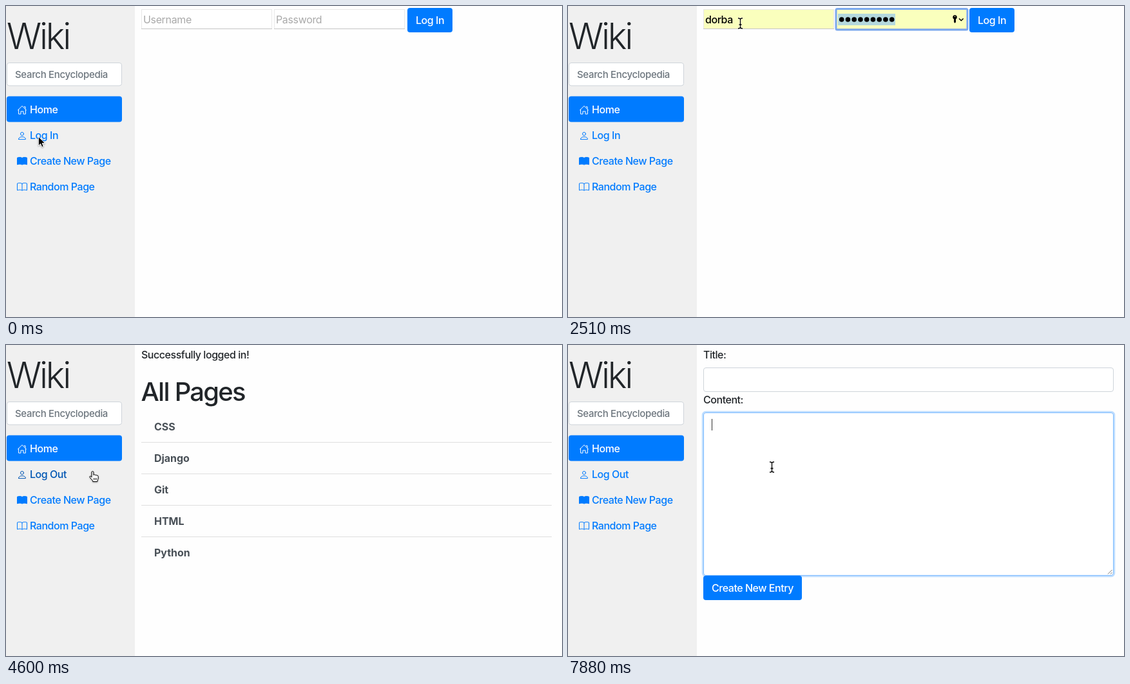
An HTML page that plays this animation: 863x484 px, repeating every 8000 ms.

```html
<!DOCTYPE html>
<html lang="en">
<head>
<meta charset="utf-8">
<title>Wiki</title>
<style>
  html, body { margin: 0; width: 100%; height: 100%; overflow: hidden; background: #fefefe; }
  svg { display: block; width: 100%; height: 100%; }
  text {
    font: 450 16px Inter, "Liberation Sans", sans-serif;
    font-optical-sizing: none;
    letter-spacing: -.029em;
    fill: #212529;
    white-space: pre;
  }
  .brand { font-size: 56px; font-weight: 300; letter-spacing: -.057em; }
  .heading { font-size: 40px; font-weight: 500; letter-spacing: -.044em; }
  .search { font-size: 15px; letter-spacing: -.022em; fill: #6c757d; }
  .hint { font-weight: 400; letter-spacing: -.022em; fill: #a9a9a9; }
  .item { font-weight: 700; letter-spacing: -.002em; fill: #495057; }
  .small { font-size: 13px; }
  .tiny { font-size: 11px; fill: #85858a; }
  .light, .light text { fill: #fff; color: #fff; }
  .link { color: #007bff; }
  .link.hover { color: #0056b3; }
  .link text { fill: currentColor; }
  .solid { fill: currentColor; }
  .line { fill: none; stroke: currentColor; stroke-linejoin: round; stroke-linecap: round; }
  .line.solid { fill: currentColor; }
  .primary { fill: #007bff; }
  .control { fill: #fff; stroke: #ced4da; }
  .ring { fill: none; stroke: #7ba8ee; stroke-width: 3; }
  .popup { filter: drop-shadow(0 2px 4px rgba(0, 0, 0, .3)); }
  .cursor { filter: drop-shadow(0 1px .8px rgba(0, 0, 0, .35)); }
</style>
</head>
<body>
<svg viewBox="0 0 863 484">
  <defs>
    <g id="field">
      <rect width="202" height="30" x=".5" y=".5" stroke="#e8e8e8"/>
      <path d="M0 30.5H203" stroke="#c6c6c6"/>
    </g>
    <path id="house" d="M1.5 8 8 1.6 14.5 8M2.6 7.2V14.1H6V10H10V14.1H13.4V7.2M11.2 2.8H13V5.6"/>
    <g id="person">
      <circle cx="8" cy="5" r="2.5"/>
      <path d="M2.5 13.3C2.5 11.3 4.4 9.6 8 9.6S13.5 11.3 13.5 13.3Q13.5 13.6 13 13.6H3Q2.5 13.6 2.5 13.3Z"/>
    </g>
    <path id="pages" d="M8 3C6.3 1.7 3 1.6.5 2.7V13.3C3 12.4 6.3 12.3 8 13.5 9.7 12.3 13 12.4 15.5 13.3V2.7C13 1.6 9.7 1.7 8 3Z"/>
    <path id="caret" d="M-3.5-8Q0-8 0-6 0-8 3.5-8M0-6.5V6.5M-3.5 8Q0 8 0 6 0 8 3.5 8M-2 2H2"/>
  </defs>

  <!-- Sidebar -->
  <rect width="200" height="484" fill="#f0f0f0"/>
  <text class="brand" x="1" y="67">Wiki</text>
  <rect class="control" x="1.5" y="88.5" width="178" height="35.5" rx="3.5"/>
  <text class="search" x="14" y="112">Search Encyclopedia</text>
  <rect class="primary" x="1" y="140.5" width="179" height="40" rx="4"/>
  <g class="light">
    <use href="#house" class="line" x="17" y="154"/>
    <text x="37" y="167">Home</text>
  </g>
  <g class="link" data-hover="4600-5190">
    <use href="#person" class="line" x="17" y="194"/>
    <text x="37" y="207" data-on="0-3560">Log In</text>
    <text x="37" y="207" data-on="3560-8000">Log Out</text>
  </g>
  <g class="link" data-hover="5190-7130 7430-7580">
    <use href="#pages" class="line solid" x="17" y="233.5"/>
    <text x="37" y="247">Create New Page</text>
  </g>
  <g class="link">
    <use href="#pages" class="line" x="17" y="273.5"/>
    <path class="line" d="M25 276.5V287"/>
    <text x="37" y="287">Random Page</text>
  </g>

  <!-- Log in form -->
  <g data-on="0-3560">
    <g data-on="0-2510">
      <use href="#field" x="210" y="5" fill="#fff"/>
      <use href="#field" x="416" y="5" fill="#fff"/>
      <text class="hint" x="213" y="27">Username</text>
      <text class="hint" x="419" y="27">Password</text>
    </g>
    <g data-on="1470-2510">
      <rect class="ring" x="209.5" y="4.5" width="204" height="32.5" rx="2"/>
      <path d="M213.5 12V30" stroke="#000" data-on="1470-2060"/>
      <rect class="popup" x="208" y="41" width="198" height="84" rx="5" fill="#f8f8f8"/>
      <text class="small" x="222" y="60">dorba</text>
      <text class="tiny" x="222" y="77">Saved password</text>
      <path d="M208 89.5H406" stroke="#dcdcdc"/>
      <text class="small" x="222" y="111">Other Passwords…</text>
    </g>
    <g data-on="2510-3560">
      <use href="#field" x="210" y="5" fill="#faffbd"/>
      <use href="#field" x="416" y="5" fill="#faffbd"/>
      <rect class="ring" x="416" y="4.5" width="204" height="32.5" rx="2"/>
      <text x="213" y="27" style="fill:#000">dorba</text>
      <rect x="419" y="12" width="89" height="18" fill="#b4d8dd"/>
      <g id="dots"></g>
      <path d="M600.5 14A3.4 3.4 0 0 1 602 20.4V25L600.5 26.7 599 25V20.4A3.4 3.4 0 0 1 600.5 14Z"/>
      <circle cx="600.5" cy="16.2" r=".8" fill="#faffbd"/>
      <path d="M607 19.5 610.3 22.8 613.6 19.5" fill="none" stroke="#000" stroke-width="1.5"/>
    </g>
    <g class="light">
      <rect class="primary" x="623" y="3" width="70" height="38" rx="4"/>
      <text x="636" y="28">Log In</text>
    </g>
  </g>

  <!-- Page list -->
  <g data-on="3560-7130">
    <text x="210" y="21">Successfully logged in!</text>
    <text class="heading" x="209.5" y="87">All Pages</text>
    <g id="list"></g>
  </g>

  <!-- New entry form -->
  <g data-on="7130-8000">
    <text x="210" y="21">Title:</text>
    <rect class="control" x="210.5" y="35.5" width="636" height="37" rx="3.5"/>
    <text x="210" y="91">Content:</text>
    <rect class="control" x="210.5" y="105.5" width="636" height="253" rx="3.5"/>
    <g data-on="7880-8000">
      <rect x="209" y="104" width="639" height="256" rx="5" fill="none" stroke="#bfdeff" stroke-width="2.5"/>
      <rect class="control" x="210.5" y="105.5" width="636" height="253" rx="3.5" style="stroke:#80bdff"/>
      <path d="M223.5 115V133" stroke="#333"/>
    </g>
    <path d="M838 356.5 844.5 350M842 356.5 844.5 354" stroke="#666" stroke-width=".9"/>
    <g class="light">
      <rect class="primary" x="210" y="359" width="153" height="38" rx="4"/>
      <text x="223" y="384">Create New Entry</text>
    </g>
  </g>

  <!-- Pointers -->
  <g id="arrow" class="cursor">
    <path d="M.3.2V14.6L3.6 11.5 5.8 16.6 8.3 15.5 6.2 10.6H10.8Z" stroke="#fff"/>
  </g>
  <g id="beam" fill="none">
    <use href="#caret" stroke="#fff" stroke-width="2.6" opacity=".7"/>
    <use href="#caret" stroke="#000" stroke-width="1.3"/>
  </g>
  <g id="hand" class="cursor" stroke="#000" stroke-linejoin="round">
    <path fill="#fff" d="M4 2A1.4 1.4 0 0 1 6.9 2V6.4A1.4 1.4 0 0 1 9.5 6.7 1.4 1.4 0 0 1 12 7.4 1.3 1.3 0 0 1 14.2 8.4V11C14.2 13 12.8 14 12.8 16.6H5.7V15.2C4.2 13.4 2.5 11.7 1.1 9.8.2 8.3 2 7.5 3 8.6L4 9.8Z"/>
    <path d="M7.4 11V14M9.4 11V14M11.4 11V14" stroke-width=".8"/>
  </g>
</svg>
<script>
const LOOP = 8000;

// time, pointer, x, y
const pointerSteps = [
  [0, 'arrow', 50, 203],
  [140, 'arrow', 244, 70],
  [290, 'arrow', 267, 59],
  [430, 'arrow', 278, 44],
  [580, 'arrow', 283, 38],
  [1180, 'arrow', 280, 36],
  [1320, 'beam', 267.5, 27],
  [3260, 'arrow', 266, 26],
  [4160, 'beam', 267.5, 52.5],
  [4300, 'beam', 267.5, 61.5],
  [4450, 'arrow', 245, 94],
  [4600, 'hand', 129, 196],
  [4890, 'hand', 111, 202],
  [5040, 'hand', 90, 220],
  [5190, 'hand', 85, 233],
  [5340, 'hand', 82, 239],
  [7130, 'arrow', 86, 238],
  [7430, 'hand', 87, 234],
  [7580, 'beam', 254.5, 213],
  [7730, 'beam', 316.5, 190],
];

const byId = id => document.getElementById(id);

byId('dots').innerHTML = Array.from({ length: 9 }, (_, i) =>
  `<circle cx="${424.7 + i * 9.75}" cy="21" r="3.8"/>`).join('');

byId('list').innerHTML = ['CSS', 'Django', 'Git', 'HTML', 'Python'].map((name, i) =>
  (i ? `<path d="M210 ${102.5 + i * 49}H847" stroke="#dfdfdf"/>` : '') +
  `<text class="item" x="230" y="${133 + i * 49}">${name}</text>`).join('');

const parseSpans = value => value.split(' ').map(span => span.split('-').map(Number));
const collect = key => [...document.querySelectorAll(`[data-${key}]`)]
  .map(el => ({ el, spans: parseSpans(el.dataset[key]) }));
const within = (spans, t) => spans.some(([from, to]) => t >= from && t < to);

const timed = collect('on');
const hovers = collect('hover');
const pointers = ['arrow', 'beam', 'hand'].map(byId);

function render(t) {
  for (const { el, spans } of timed) el.style.display = within(spans, t) ? '' : 'none';
  for (const { el, spans } of hovers) el.classList.toggle('hover', within(spans, t));
  const [, shape, x, y] = pointerSteps.findLast(step => step[0] <= t);
  for (const el of pointers) el.style.display = el.id === shape ? '' : 'none';
  byId(shape).setAttribute('transform', `translate(${x} ${y})`);
}

const start = performance.now();
function tick() {
  render((performance.now() - start) % LOOP);
  requestAnimationFrame(tick);
}
tick();
</script>
</body>
</html>
```
